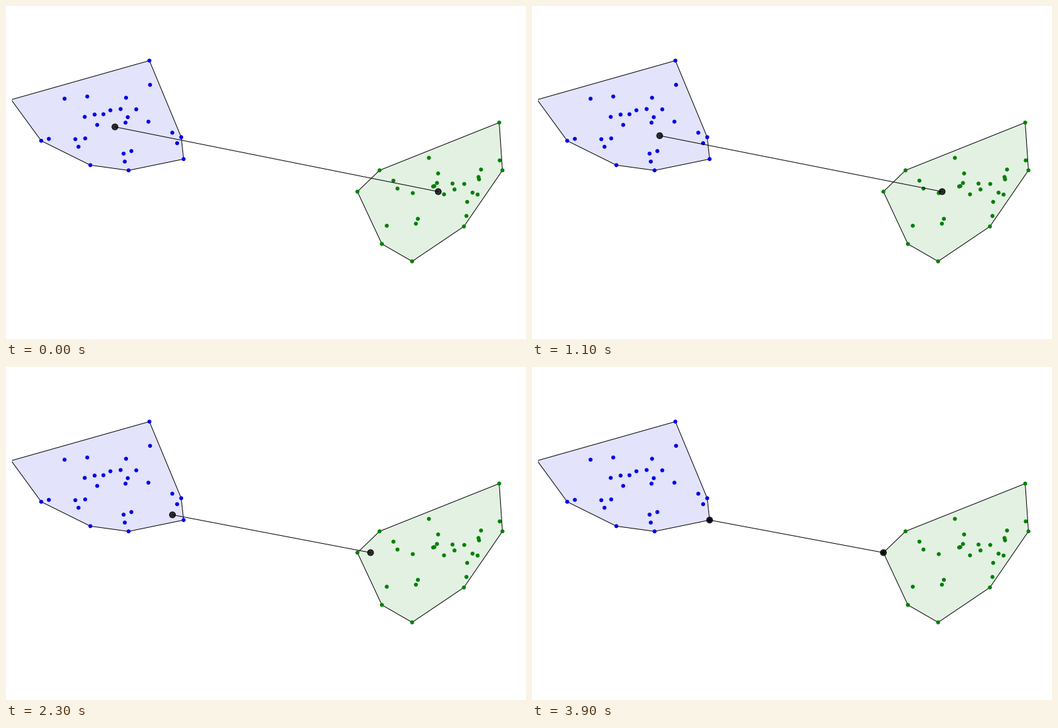
A matplotlib script that plays this animation: 784 by 503 pixels, repeating every 4.9 s.

```python
import numpy as np
import matplotlib.pyplot as plt
from matplotlib.animation import FuncAnimation
from matplotlib.collections import PatchCollection
from matplotlib.patches import Circle, Polygon, Rectangle

WIDTH, HEIGHT, DPI = 784, 503, 100
PX = 72 / DPI
FRAMES, INTERVAL, LAST_MOVE = 49, 100, 39
DOT_RADIUS, CENTER_RADIUS = 3, 5

BLUE_HULL = [(7.8, 141.5), (216.2, 82.5), (264.2, 198.2), (267.8, 231.2),
             (184.8, 248.3), (127.2, 240.4), (53.1, 203.6)]
BLUE_INNER = [(88.3, 140), (122.5, 136.7), (217.2, 119.1), (181, 138.6),
              (118.7, 167.5), (133.6, 164), (146.9, 163.5), (157.4, 157.5),
              (172.8, 155.6), (196.4, 156.1), (183.6, 167.9), (180.2, 176.2),
              (137.5, 179.6), (214.7, 174.7), (250.7, 191.4), (258, 207.2),
              (64.6, 200.7), (104.5, 201.2), (119.4, 200), (109.3, 212.6),
              (177.3, 223), (189, 219.1), (179.1, 235)]

GREEN_HULL = [(529.8, 280.4), (563.2, 248.2), (743.6, 176.1), (748.5, 248.2),
              (690.4, 333), (612.3, 385.7), (566.7, 359.4)]
GREEN_INNER = [(637.6, 229.4), (744.4, 233.2), (716.2, 247), (651.5, 252.9),
               (584.1, 263.8), (590.2, 275.7), (613.3, 282.6), (649.8, 267.3),
               (644, 272.6), (645.8, 272), (673.2, 268.2), (676.2, 277.1),
               (690.9, 268.8), (712.4, 258.3), (713.2, 261.8), (660.4, 284.5),
               (703.4, 281.9), (711, 284.8), (695.3, 295.9), (694.2, 317.1),
               (621, 321.5), (618, 328.8), (574.1, 331.9)]

STARTS = np.array([(160.8, 181), (655.7, 280.4)])
ENDS = np.array([BLUE_HULL[3], GREEN_HULL[0]])

fig = plt.figure(figsize=(WIDTH / DPI, HEIGHT / DPI), dpi=DPI, facecolor="white")
ax = fig.add_axes([0, 0, 1, 1])
ax.set(xlim=(0, WIDTH), ylim=(HEIGHT, 0))
ax.axis("off")


def draw_cluster(hull, dots, color):
    view = Rectangle((9, 9), WIDTH - 18, HEIGHT - 18, transform=ax.transData)
    for style in ({"fc": color, "ec": "none", "alpha": 0.11},
                  {"fc": "none", "ec": "black", "lw": PX}):
        area = ax.add_patch(Polygon(hull, zorder=1, **style))
        area.set_clip_path(view)
    circles = [Circle(p, DOT_RADIUS) for p in dots]
    ax.add_collection(PatchCollection(circles, fc=color, ec="none", zorder=2))


draw_cluster(BLUE_HULL, BLUE_HULL[1:] + BLUE_INNER, "#0000e6")
draw_cluster(GREEN_HULL, GREEN_HULL + GREEN_INNER, "#008000")

link, = ax.plot([], [], color="black", lw=PX, zorder=3)
centers = [ax.add_patch(Circle(p, CENTER_RADIUS - 0.5, fc=(0, 0, 0, 0.8),
                               ec="black", lw=PX, zorder=4)) for p in STARTS]


def ease_cubic(t):
    return 4 * t**3 if t < 0.5 else 1 - 4 * (1 - t)**3


def update(frame):
    # The move begins a fifth of the way into the easing.
    progress = ease_cubic(0.2 + 0.02 * min(frame, LAST_MOVE))
    positions = STARTS + (ENDS - STARTS) * progress
    link.set_data(positions[:, 0], positions[:, 1])
    for circle, position in zip(centers, positions):
        circle.center = position
    return [link, *centers]


animation = FuncAnimation(fig, update, frames=FRAMES, interval=INTERVAL,
                          repeat=True, repeat_delay=0, blit=False)
plt.show()
```
